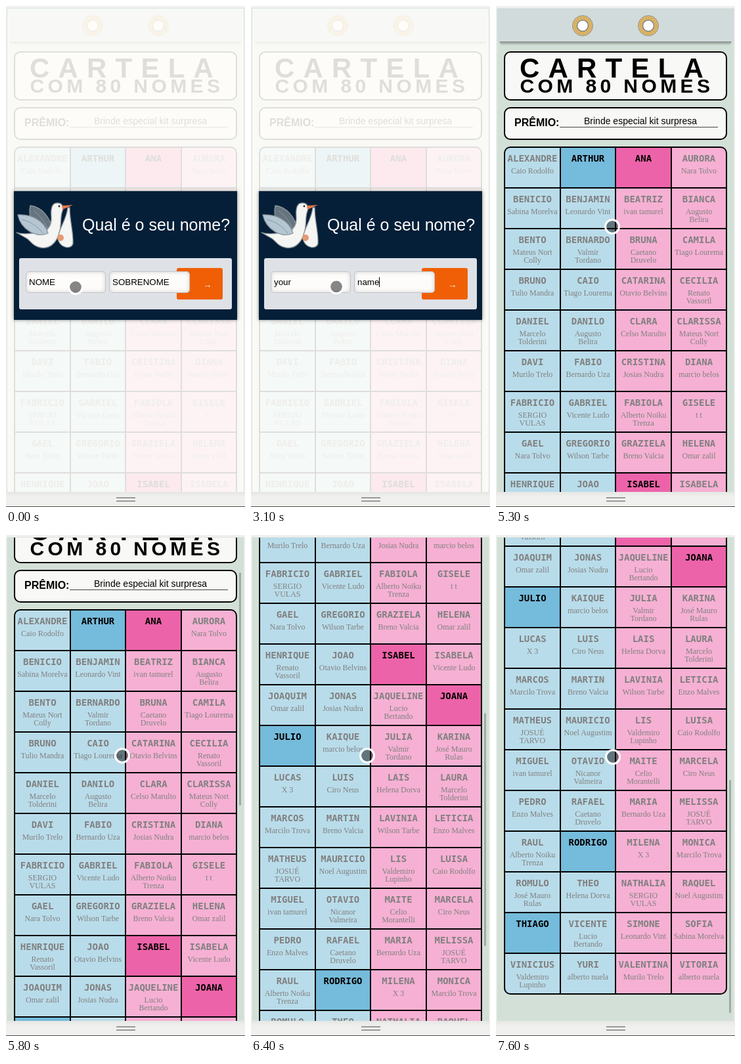
These frames come from a looping animation (364x763 px, 8000 ms). An HTML page:

```html
<!DOCTYPE html>
<html lang="pt-BR">
<head>
<meta charset="utf-8">
<title>Cartela com 80 nomes</title>
<style>
html, body { margin: 0; width: 100%; height: 100%; overflow: hidden; background: #f0f0ee; }
#stage { position: relative; width: 364px; height: 763px; overflow: hidden; font-family: "Liberation Sans", Arial, sans-serif; }
#stage div, #stage svg { position: absolute; box-sizing: border-box; }
#frame { left: 1px; top: 3px; width: 362px; height: 738px; background: #dde5e0; }
#view { left: 2px; top: 4px; width: 360px; height: 736px; overflow: hidden; background: #d3e0d7; }
#page { left: -2px; top: -4px; width: 364px; height: 1497px; }
#grid {
  left: 12px; top: 214px; width: 340px; height: 1242px; overflow: hidden;
  border: 2px solid #000; border-radius: 10px; background: #000;
  display: grid; grid: auto-flow 60px / 83px 82px 83px 82px; gap: 2px;
}
#stage .cell { position: static; padding-top: 8px; text-align: center; white-space: nowrap; color: #808080; }
.cell b { display: block; font: bold 14px/16px "DejaVu Sans Mono", monospace; }
.cell span { display: block; margin-top: 5px; font: 12px/12px "Liberation Serif", Times, serif; }
.boy { background: #b9dcea; }
.girl { background: #f6b0d3; }
#stage .free { color: #000; }
.boy.free { background: #75bbdb; }
.girl.free { background: #ed63a9; }
#bar { left: 355px; top: 0; width: 3px; height: 355px; border-radius: 2px; background: rgba(0, 0, 0, .24); }
#dim { left: 2px; top: 4px; width: 360px; height: 736px; background: rgba(254, 253, 250, .88); }
#dialog { left: 12px; top: 282px; width: 340px; height: 196px; background: #051f38; box-shadow: 0 0 5px rgba(0, 0, 0, .5); }
#panel { left: 8px; top: 102px; width: 324px; height: 78px; border-radius: 3px; background: #dee1e6; }
#go { left: 248px; top: 117px; width: 70px; height: 48px; border-radius: 3px; background: #f05f05; color: #fff; font-size: 13.33px; line-height: 52px; padding-left: 40px; }
#stage .field {
  top: 122px; height: 33px; padding-left: 4px; border: 1px solid #c3c5c8; border-radius: 5px;
  background: #fdfcfb; box-shadow: inset 0 0 6px rgba(0, 0, 0, .17);
  font-size: 13.33px; line-height: 31px; color: #000; white-space: nowrap;
}
#first { left: 18px; width: 122px; }
#last { left: 145px; width: 123px; }
.field.empty { color: #757575; }
.field.wavy span { text-decoration: underline wavy #e0302c 1px; text-underline-offset: 1px; text-decoration-skip-ink: none; }
#caret { top: 131px; width: 1px; height: 15px; background: #000; }
#foot { left: 0; top: 740px; width: 364px; height: 23px; background: linear-gradient(#e6e7e5, #f0f0ee 8px); border-bottom: 1px solid #4a4a4a; }
#foot::before { content: ""; position: absolute; left: 168px; top: 8px; width: 29px; height: 7px; box-sizing: border-box; border: solid #9a9a9a; border-width: 2px 0; }
#pointer { left: -12px; top: -12px; width: 24px; height: 24px; border: 3px solid #fff; border-radius: 50%; background: rgba(0, 0, 0, .47) padding-box; }
#pointer.down { background-color: rgba(0, 0, 0, .72); }
</style>
</head>
<body>
<div id="stage">
  <div id="frame"></div>
  <div id="view">
    <div id="page">
      <svg width="364" height="214" font-family="Liberation Sans, Arial, sans-serif">
        <defs>
          <linearGradient id="shade" x2="0" y2="1">
            <stop stop-color="#000" stop-opacity=".38"/><stop offset="1" stop-color="#000" stop-opacity="0"/>
          </linearGradient>
          <g id="eyelet">
            <circle r="15.5" fill="#dbb566" stroke="#8f9596"/>
            <circle r="12" fill="none" stroke="#c79f52" stroke-dasharray="2 2"/>
            <circle r="8.5" fill="#fff" stroke="#7f7f7c" stroke-width="1.5"/>
          </g>
        </defs>
        <path d="M5 54H359L356 60H8Z" fill="url(#shade)"/>
        <path d="M2 4H362V54H2Z" fill="#d2dbdb"/>
        <use href="#eyelet" x="132" y="30"/>
        <use href="#eyelet" x="232" y="30"/>
        <g fill="#f8f8f6" stroke="#000" stroke-width="2">
          <rect x="13" y="70" width="338" height="73" rx="9"/>
          <rect x="13" y="155" width="338" height="48" rx="9"/>
        </g>
        <g font-weight="bold">
          <text x="36" y="109" font-size="42" letter-spacing="13.2">CARTELA</text>
          <text x="36.5" y="132" font-size="30" letter-spacing="5.4">COM 80 NOMES</text>
          <text x="28" y="183" font-size="16">PRÊMIO:</text>
        </g>
        <text x="220" y="180" font-size="14" text-anchor="middle">Brinde especial kit surpresa</text>
        <path d="M97 184.5H338" stroke="#444"/>
      </svg>
      <div id="grid"></div>
    </div>
  </div>
  <div id="bar"></div>
  <div id="ask">
    <div id="dim"></div>
    <div id="dialog">
      <svg width="340" height="196" viewBox="12 282 340 196" stroke-linejoin="round">
        <g stroke="#8b959d" stroke-width="1.3">
          <path d="M37 304C53 306 68 320 71 343L54 348C41 338 33 321 37 304Z" fill="#66747f"/>
          <path d="M16 345C28 349 40 346 50 345C63 343 70 335 69 321C68 308 70 300 78 300C86 300 88 306 86 312C82 322 85 333 81 346C76 363 65 370 53 368C40 366 37 356 30 353Z" fill="#f5f5f3"/>
          <path d="M18 318C38 317 58 326 64 346C47 354 23 341 18 318Z" fill="#b5c6d3"/>
          <path d="M94 307C93 324 79 342 79 354C81 368 99 372 102 362C103 345 97 328 97 307Z" fill="#f5f5f3"/>
        </g>
        <path d="M85 304L102 303L86 310Z" fill="#e9784a"/>
        <circle cx="81" cy="305" r="1.4" fill="#222"/>
        <circle cx="83" cy="353" r="5" fill="#e59a72"/>
        <path d="M24 325C36 328 48 335 56 346M42 312C52 319 60 330 64 341" fill="none" stroke="#8597a5"/>
        <text x="116" y="342" font-family="Liberation Sans, Arial, sans-serif" font-size="25" fill="#fff">Qual é o seu nome?</text>
      </svg>
      <div id="panel"></div>
      <div id="go">→</div>
      <div id="first" class="field"><span></span></div>
      <div id="last" class="field"><span></span></div>
      <div id="caret"></div>
    </div>
  </div>
  <div id="foot"></div>
  <div id="pointer"></div>
</div>
<script>
const $ = id => document.getElementById(id);

// "/" marks a line break
const people = `Caio Rodolfo,Nara Tolvo,Sabina Morelva,Leonardo Vint,ivan tamurel,Augusto/Belira,
Mateus Nort/Colly,Valmir/Tordano,Caetano/Druvelo,Tiago Lourema,Tulio Mandra,Otavio Belvins,
Renato/Vassoril,Marcelo/Tolderini,Celso Marulto,Murilo Trelo,Bernardo Uza,Josias Nudra,
marcio belos,SERGIO/VULAS,Vicente Ludo,Alberto Noiku/Trenza,Wilson Tarbe,Breno Valcia,
Omar zalil,Lucio/Bertando,José Mauro/Rulas,Ciro Neus,Helena Dorva,Marcilo Trova,
Enzo Malves,JOSUÉ/TARVO,Noel Augustim,Valdemiro/Lupinho,Nicanor/Valmeira,Celio/Morantelli,
alberto nuela,X 3,t t`.split(/,\s*/);

// each name with the index of its buyer; none means still free
const cells = `ALEXANDRE:0 ARTHUR ANA AURORA:1
BENICIO:2 BENJAMIN:3 BEATRIZ:4 BIANCA:5
BENTO:6 BERNARDO:7 BRUNA:8 CAMILA:9
BRUNO:10 CAIO:9 CATARINA:11 CECILIA:12
DANIEL:13 DANILO:5 CLARA:14 CLARISSA:6
DAVI:15 FABIO:16 CRISTINA:17 DIANA:18
FABRICIO:19 GABRIEL:20 FABIOLA:21 GISELE:38
GAEL:1 GREGORIO:22 GRAZIELA:23 HELENA:24
HENRIQUE:12 JOAO:11 ISABEL ISABELA:20
JOAQUIM:24 JONAS:17 JAQUELINE:25 JOANA
JULIO KAIQUE:18 JULIA:7 KARINA:26
LUCAS:37 LUIS:27 LAIS:28 LAURA:13
MARCOS:29 MARTIN:23 LAVINIA:22 LETICIA:30
MATHEUS:31 MAURICIO:32 LIS:33 LUISA:0
MIGUEL:4 OTAVIO:34 MAITE:35 MARCELA:27
PEDRO:30 RAFAEL:8 MARIA:16 MELISSA:31
RAUL:21 RODRIGO MILENA:37 MONICA:29
ROMULO:26 THEO:28 NATHALIA:19 RAQUEL:32
THIAGO VICENTE:25 SIMONE:3 SOFIA:2
VINICIUS:33 YURI:36 VALENTINA:15 VITORIA:36`.split(/\s+/);

$('grid').innerHTML = cells.map((cell, i) => {
  const [name, buyer] = cell.split(':');
  const kind = i % 4 < 2 ? 'boy' : 'girl';
  const label = buyer ? `<span>${people[buyer].replace('/', '<br>')}</span>` : '';
  return `<div class="cell ${kind}${buyer ? '' : ' free'}"><b>${name}</b>${label}</div>`;
}).join('');

const LOOP = 8000, STEP = 100;
const scrollPath = [[5600, 0], [5700, 32], [6000, 240], [6400, 545], [6500, 598], [6600, 626], [6700, 636],
  [7000, 636], [7100, 652], [7400, 732], [7600, 756]];
const xPath = [[2900, 106], [3100, 130], [3600, 285], [3800, 307], [4900, 307], [5300, 177], [6500, 177], [6600, 178]];
const yPath = [[2900, 428], [3800, 425], [4900, 425], [5300, 336], [6500, 336], [6600, 338]];
const firstKeys = [600, 800, 1100, 1400], lastKeys = [2100, 2300, 2500, 2800];

function along(path, t) {
  const i = path.findIndex(p => p[0] > t);
  if (i === 0) return path[0][1];
  if (i < 0) return path[path.length - 1][1];
  const [t0, a] = path[i - 1], [t1, b] = path[i];
  return a + (b - a) * (t - t0) / (t1 - t0);
}

function type(field, word, keys, hint, t) {
  const text = word.slice(0, keys.filter(k => k <= t).length);
  const span = field.firstElementChild;
  span.textContent = text || hint;
  field.classList.toggle('empty', !text);
  return field.offsetLeft + 5 + (text ? span.offsetWidth : 0);
}

function draw() {
  const t = Math.floor(performance.now() % LOOP / STEP) * STEP;
  const asking = t < 4400;
  $('ask').style.display = asking ? '' : 'none';
  if (asking) {
    const end1 = type($('first'), 'your', firstKeys, 'NOME', t);
    const end2 = type($('last'), 'name', lastKeys, 'SOBRENOME', t);
    $('last').classList.toggle('wavy', t >= 4100);
    $('caret').style.left = (t < 1500 ? end1 : end2) + 'px';
    $('caret').style.display = t >= 200 && t < 4100 ? '' : 'none';
  }
  const y = Math.round(along(scrollPath, t));
  $('page').style.transform = `translateY(${-y}px)`;
  $('bar').style.display = y ? '' : 'none';
  $('bar').style.transform = `translateY(${Math.round(8 + y * .4826)}px)`;
  $('pointer').style.transform = `translate(${along(xPath, t)}px, ${along(yPath, t)}px)`;
  $('pointer').classList.toggle('down', t >= 4100 && t < 4800);
  requestAnimationFrame(draw);
}
draw();
</script>
</body>
</html>
```
